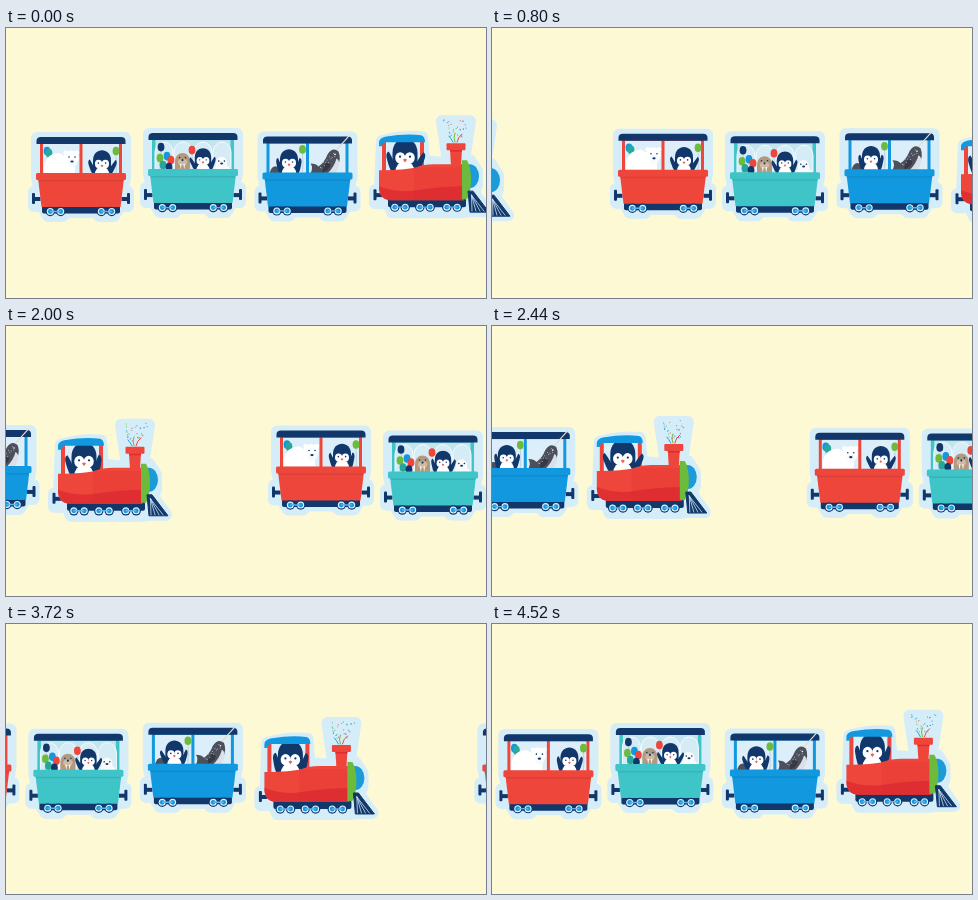
Write an HTML page that moves like this. It is 480 px wide and 270 px high and loops after 4560 ms.

```html
<!DOCTYPE html>
<html lang="en">
<head>
<meta charset="utf-8">
<title>Party train</title>
<style>
html, body { margin: 0; width: 100%; height: 100%; overflow: hidden; background: #fdf9d5; }
svg { display: block; width: 100vw; height: 100vh; }
</style>
</head>
<body>
<svg id="stage" viewBox="0 0 480 270"></svg>
<script>
const NAVY = '#11376b', RED = '#ef463b', DARK_RED = '#dd2b30', TEAL = '#3fc4c8', BLUE = '#1198df',
  GREEN = '#6dbb3c', HALO = '#d5ecf9', GLASS = '#dceefa', GREY = '#4c4f5c', TAN = '#b39a7f';
const LOOP = 4560, STEP = 40, SPEED = 0.12, SPAN = 561;
const BOB = SPAN / SPEED / 3, BOB_START = 540;

const rect = (x, y, w, h, fill, r = 0, more = '') =>
  `<rect x="${x}" y="${y}" width="${w}" height="${h}" rx="${r}" fill="${fill}" ${more}/>`;
const oval = (x, y, rx, ry, fill, more = '') =>
  `<ellipse cx="${x}" cy="${y}" rx="${rx}" ry="${ry}" fill="${fill}" ${more}/>`;
const dot = (x, y, r, fill) => oval(x, y, r, r, fill);
const path = (d, fill, more = '') => `<path d="${d}" fill="${fill}" ${more}/>`;
const line = (d, color, w) => path(d, 'none', `stroke="${color}" stroke-width="${w}" stroke-linecap="round"`);
const halo = d => path(d, HALO, `stroke="${HALO}" stroke-width="12" stroke-linejoin="round"`);

const balloon = (x, y, color, len = 18) =>
  line(`M${x} ${y + 4}q1 ${len / 2} 0 ${len}`, '#9fb4c4', .5) + oval(x, y, 3.4, 4.3, color);

const wheel = (x, y) => dot(x, y, 4.7, NAVY) + dot(x, y, 3.5, '#e0f1fa') + dot(x, y, 2.4, BLUE);
const wheelPair = (x, y) => wheel(x - 5.2, y) + wheel(x + 5.2, y) +
  line(`M${x - 5} ${y}h10`, '#5cb4e8', 1.4);

const buffer = (x, y, dir) => rect(x - 1.5, y, 3, 11, NAVY, 1) +
  rect(dir > 0 ? x - 7 : x, y + 4, 7, 4, NAVY);

const wing = side => `<g transform="translate(${side * 8.5} 13) scale(${side} 1)"><g class="wing">` +
  path('M-2 2Q1-7 5-13Q8-12 6-6Q4 1 1 5Z', NAVY) + '</g></g>';

const penguin = (x, y, s = 1) => `<g transform="translate(${x} ${y}) scale(${s})">` +
  wing(-1) + wing(1) +
  path('M-10 22V1C-10-14 10-14 10 1V22Z', NAVY) +
  oval(0, 17, 8, 9.5, '#fff') + oval(-3.8, 5, 4, 4.6, '#fff') + oval(3.8, 5, 4, 4.6, '#fff') +
  dot(-4, 4, .9, NAVY) + dot(4, 4, .9, NAVY) +
  path('M-1.6 6.5Q0 5 1.6 6.5L0 8.6Z', '#f0605a') + '</g>';

const bear = () => path('M-37 36V28Q-33 15-21 16L-6 26V36Z', '#fff') +
  dot(-15.5, 15.5, 2.2, '#fff') + dot(-4, 15.5, 2.2, '#fff') + oval(-9.8, 21, 7.6, 7.6, '#fff') +
  oval(-9, 26, 4.6, 4.4, '#f8fbfd') + dot(-12, 20, .8, NAVY) + dot(-6, 20, .8, NAVY) +
  oval(-9, 24.5, 1.7, 1.1, NAVY);

const walrus = () => path('M-18 37V29C-18 17-3 17-3 29V37Z', TAN) +
  oval(-10.5, 29, 4.6, 3.2, '#d0bba2') + dot(-13.5, 24.5, .8, NAVY) + dot(-7.5, 24.5, .8, NAVY) +
  dot(-10.5, 27, 1.1, NAVY) + path('M-13 31h1.6l-.8 5.5zM-9.6 31h1.6l-.8 5.5z', '#fff');

const seal = () => path('M21 37Q21 34 23 32C21 21 36 21 34 32Q37 34 37 37Z', '#f8fafb') +
  dot(25.8, 28, .8, NAVY) + dot(31.4, 28, .8, NAVY) + oval(28.6, 30.3, 1.5, 1, NAVY);

const narwhal = () => {
  let spots = '';
  for (let i = 0; i < 12; i++)
    spots += dot(13 + i * 1.3, 31 - i * 1.2 + 2.5 * Math.sin(i * 2.4), .5, '#c3c8d1');
  return path('M3 37Q6 31 3 27Q9 27 11 30Q17 26 20 18Q25 10 31 15Q34 22 30 30L27 37Z', GREY) +
    path('M20 37Q27 30 29 22Q33 24 31 31L28 37Z', '#d9e0e7') +
    path('M19 26Q14 31 15 36Q22 34 23 28Z', '#363944') + spots + dot(27.5, 18, .8, '#fff');
};

const carHalo = halo('M-44 1H44V40L41 55H47V69H39L33 79H18L15 75H-15L-18 79H-33L-39 69H-47V55H-41L-44 40Z');

// Local y = 0 is the top of the roof, x = 0 the middle of the car.
function car(color, panes, riders, front = '') {
  return carHalo + buffer(-47.5, 56, -1) + buffer(47.5, 56, 1) +
    rect(-41, 5, 82, 33, color) + panes + riders +
    rect(-39, 68, 78, 8.5, NAVY, 2) +
    path('M-43 41H43L39.5 70H-39.5Z', color) +
    path('M-43 42H43L42.6 44.5H-42.6Z', '#000', 'opacity=".09"') +
    rect(-45, 36, 90, 7, color, 1.5) +
    path('M-44.5 7V4Q-44.5 0-40 0H40Q44.5 0 44.5 4V7Z', NAVY) +
    wheelPair(-25.5, 74.5) + wheelPair(25.5, 74.5) + front;
}

const twoPanes = rect(-38, 7, 36.5, 30, GLASS) + rect(1.5, 7, 36.5, 30, GLASS);
const arch = x => path(`M${x - 9} 37V19a9 10 0 0 1 18 0V37Z`, '#d5ebf6', 'stroke="#f5fbff" stroke-width="1"');

const redCar = car(RED, twoPanes,
  balloon(-34, 14, BLUE) + balloon(-32, 16, '#29a99c') + bear() + balloon(35, 14, GREEN) + penguin(21, 22.5, .9));

const cluster = [[-32, 14, NAVY], [-26, 23, BLUE], [-33, 25, GREEN], [-22, 27, RED],
  [-30, 32, '#26a69a'], [-24, 34, NAVY]]
  .map(([x, y, c]) => balloon(x, y, c, 8)).join('');
const tealCar = car(TEAL, rect(-37.5, 7, 75, 30, '#c3e6ee') + [-29, -10, 10, 29].map(arch).join(''),
  cluster + walrus() + seal() + balloon(-1, 17, RED) + penguin(10, 23.5, .82));

const blueCar = car(BLUE, twoPanes,
  path('M-38 37Q-36 29-31 30Q-26 32-25 37Z', GREY) + balloon(-5, 13, GREEN) + penguin(-18.5, 22, .9) + narwhal(),
  line('M29.5 13L42-1', '#e4dcc0', 1.2));

// Local origin is the middle of the chimney's top edge.
const bars = [16, 20, 24, 28].map(x => line(`M15.5 52L${x} 68`, '#cfe4f4', .8)).join('');
const body = 'M-77 27Q-50 27-40 24Q-32 21-22 21H8V57H-66Q-77 56-77 44Z';
const engine =
  halo('M-74-2Q-54-8-34-6L-32 18L-8 20L-10 5L-14-22H14L10 5L8 17H14L21 28V42L18 50L31 68H14L6 69H-64L-68 60H-81V47H-76Z') +
  buffer(-81, 46, -1) +
  rect(-74, -3, 42, 31, RED) + rect(-70, -2, 34, 30, GLASS) +
  penguin(-51, 8.5, 1.25) +
  path('M-77 3V-1Q-77-5-71-6.5Q-50-10-35-8Q-31-7-31-1H-71Q-74 0-74 3Z', BLUE) +
  rect(-68, 55, 78, 9, NAVY, 2) +
  oval(14, 33, 9, 12, '#1c9bd9') +
  path('M-6 6H6L5 23H-5Z', RED) + path(body, RED) +
  path('M-77 43Q-58 50-40 47Q-14 43 8 43V57H-66Q-77 56-77 43Z', DARK_RED, 'opacity=".8"') +
  rect(-42, 24, 50, 33, DARK_RED, 0, 'opacity=".2"') +
  rect(-9.5, 0, 19, 7, RED, 1) + rect(-6, 7, 12, 1.5, DARK_RED) +
  path('M6 17H11Q15 24 15 36Q15 49 11 56H6Z', GREEN) +
  path('M12 48H17L33 69H14Z', NAVY, `stroke="${NAVY}" stroke-linejoin="round"`) + bars +
  wheelPair(-56, 64) + wheelPair(-31, 64) + wheelPair(-4, 64) + '<g id="confetti"></g>';

// Each vehicle: x at the start, middle height, bob size, drawing.
const cars = [[75, 107.3, -3, redCar], [187, 106.8, 3, tealCar], [301.5, 106.7, -3, blueCar], [450, 117.3, 3.8, engine]];
const stage = document.getElementById('stage');
stage.innerHTML = '<g id="train">' + cars.map(c => `<g class="car">${c[3]}</g>`).join('') +
  `</g><use href="#train" x="${-SPAN}"/>`;
const train = document.getElementById('train'), confetti = document.getElementById('confetti');
const groups = [...document.querySelectorAll('.car')], wings = [...document.querySelectorAll('.wing')];

const noise = n => { const v = Math.sin(n * 91.7 + 3.1) * 4375.5; return v - Math.floor(v); };
const colors = [RED, BLUE, GREEN, '#4f86b8', '#29a99c'];

function drawConfetti(t) {
  let out = line('M-1-1Q-3-6-1-10', GREEN, 1) + line('M1-1Q2-6 6-9', RED, 1) + line('M-3-1Q-5-5-7-7', BLUE, .9);
  for (let i = 0; i < 28; i++) {
    const p = (t / BOB + noise(i)) % 1, rise = 6 + 18 * p;
    const x = (noise(i + 40) - .5) * (7 + rise * .85);
    out += rect((x - .5).toFixed(2), (-rise).toFixed(2), 1, 1, colors[i % 5], 0, 'opacity=".85"');
  }
  confetti.innerHTML = out;
}

function draw(now) {
  const t = Math.floor((now % LOOP) / STEP) * STEP;
  const swing = Math.cos(2 * Math.PI * (t - BOB_START) / BOB);
  train.setAttribute('transform', `translate(${SPEED * t} 0)`);
  cars.forEach(([x, y, amp], i) =>
    groups[i].setAttribute('transform', `translate(${x} ${(y + amp * swing).toFixed(2)})`));
  wings.forEach((w, i) => w.setAttribute('transform', `rotate(${(8 * Math.sin(4 * Math.PI * t / BOB + i)).toFixed(2)})`));
  drawConfetti(t);
}

let start;
function tick(now) {
  start ??= now;
  draw(now - start);
  requestAnimationFrame(tick);
}
draw(0);
requestAnimationFrame(tick);
</script>
</body>
</html>
```
